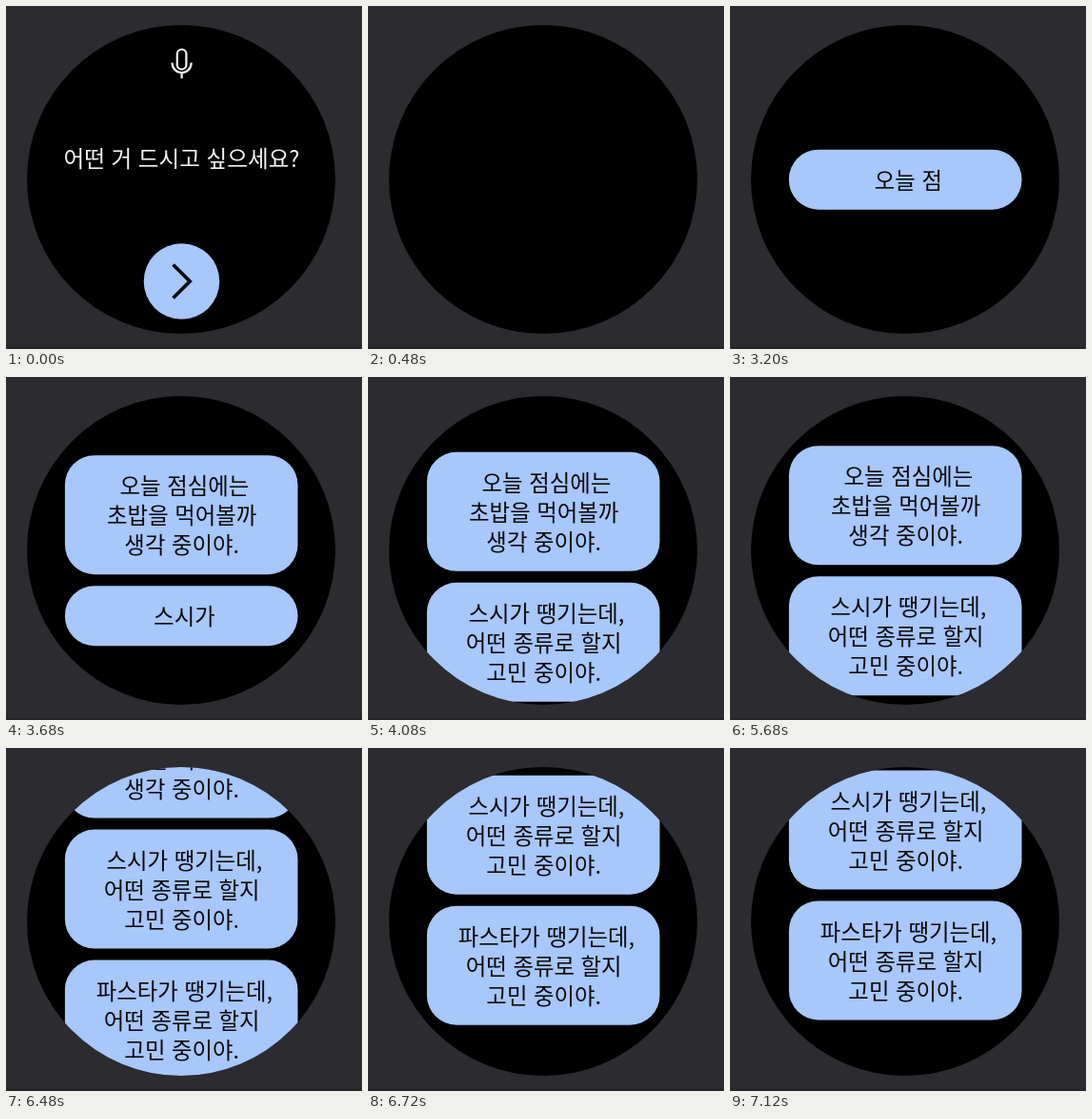
An HTML page that plays this animation: 374 px wide and 360 px high, repeating every 8.64 s.

```html
<!DOCTYPE html>
<html lang="ko">
<head>
<meta charset="utf-8">
<style>
  html, body { margin: 0; width: 100%; height: 100%; overflow: hidden; background: #2c2b30; }
  svg { display: block; width: 374px; height: 360px; }
  text { font: 23.4px "Noto Sans CJK KR", "Noto Sans CJK", "Noto Sans KR", sans-serif; text-anchor: middle; }
  #prompt text { font-size: 23.6px; font-weight: 500; fill: #f6f6fa; }
</style>
</head>
<body>
<svg viewBox="0 0 374 360">
  <defs>
    <clipPath id="face"><circle cx="184" cy="182" r="162"/></clipPath>
  </defs>
  <rect width="374" height="360" fill="#2c2b30"/>
  <rect y="358" width="374" height="2" fill="#262227"/>
  <circle cx="184" cy="182" r="162"/>
  <g id="prompt">
    <g fill="none" stroke="#f6f6fa" stroke-width="2.2">
      <rect x="179.8" y="45.5" width="9.6" height="21" rx="4.8"/>
      <path d="M174.6 59.5v.5a10 10 0 0 0 20 0v-.5M184.6 70v6"/>
    </g>
    <text x="184.5" y="168.5">어떤 거 드시고 싶으세요?</text>
    <circle cx="184.5" cy="289" r="39.8" fill="#a8c7fa"/>
    <path d="M175.6 271.5L193.2 289L175.6 306.5" fill="none" stroke="#0c0c0e" stroke-width="3.8"/>
  </g>
  <g clip-path="url(#face)"><g id="list"></g></g>
</svg>
<script>
const LOOP = 8640, STEP = 80;
const LINE = 31, GAP = 12, TOP = 78.8, CENTER = 182.2, MID = 184.7;
const SCROLL = 96.2, STIFFNESS = 200;
const messages = [
  ['오늘 점심에는', '초밥을 먹어볼까', '생각 중이야.'],
  ['스시가 땡기는데,', '어떤 종류로 할지', '고민 중이야.'],
  ['파스타가 땡기는데,', '어떤 종류로 할지', '고민 중이야.'],
];
const prompt = document.getElementById('prompt');
const list = document.getElementById('list');

function add(parent, name, attrs) {
  const node = document.createElementNS('http://www.w3.org/2000/svg', name);
  for (const key in attrs) node.setAttribute(key, attrs[key]);
  return parent.appendChild(node);
}

const cards = messages.map(lines => {
  const group = add(list, 'g', {});
  const box = add(group, 'rect', { x: 61.9, width: 244.6, rx: 31, fill: '#a8c7fa' });
  // Each message opens with a space, which nudges its first line right.
  const texts = lines.map((_, i) =>
    add(group, 'text', { x: MID + (i ? 0 : 2.7), y: 41.2 + i * LINE, fill: '#08090b' }));
  return { group, box, texts, lines };
});

// Critically damped spring from 0 to 1.
function spring(ms) {
  if (ms <= 0) return 0;
  const x = Math.sqrt(STIFFNESS) * ms / 1000;
  return 1 - (1 + x) * Math.exp(-x);
}

function typedCount(t) {
  if (t < 3200) return 0;
  if (t < 3280) return 4;
  if (t < 3440) return 8;
  if (t < 4080) return 8 + 5 * ((t - 3440) / STEP + 1);
  return Infinity;
}

function drawList(t) {
  let left = typedCount(t);
  const heights = cards.map(({ group, box, texts, lines }) => {
    let shown = 0;
    lines.forEach((line, i) => {
      const part = left > 0 ? line.slice(0, left) : '';
      texts[i].textContent = part;
      if (part) shown++;
      left -= line.length + 1;
    });
    const height = shown ? 63 + (shown - 1) * LINE : 0;
    box.setAttribute('height', height);
    group.style.display = shown ? '' : 'none';
    return height;
  });
  const visible = heights.filter(Boolean);
  const total = visible.reduce((sum, h) => sum + h + GAP, -GAP);
  const scroll = SCROLL * (spring(t - 5650) + spring(t - 6392));
  let y = Math.max(TOP, CENTER - total / 2) - scroll;
  cards.forEach(({ group }, i) => {
    group.setAttribute('transform', `translate(0 ${y.toFixed(2)})`);
    y += heights[i] + GAP;
  });
}

function draw(ms) {
  const t = Math.floor((ms % LOOP) / STEP) * STEP;
  prompt.style.opacity = Math.min(1, Math.max(0, (480 - t) / 240));
  drawList(t);
}

let start;
function frame(now) {
  start ??= now;
  draw(now - start);
  requestAnimationFrame(frame);
}
draw(0);
requestAnimationFrame(frame);
</script>
</body>
</html>
```
